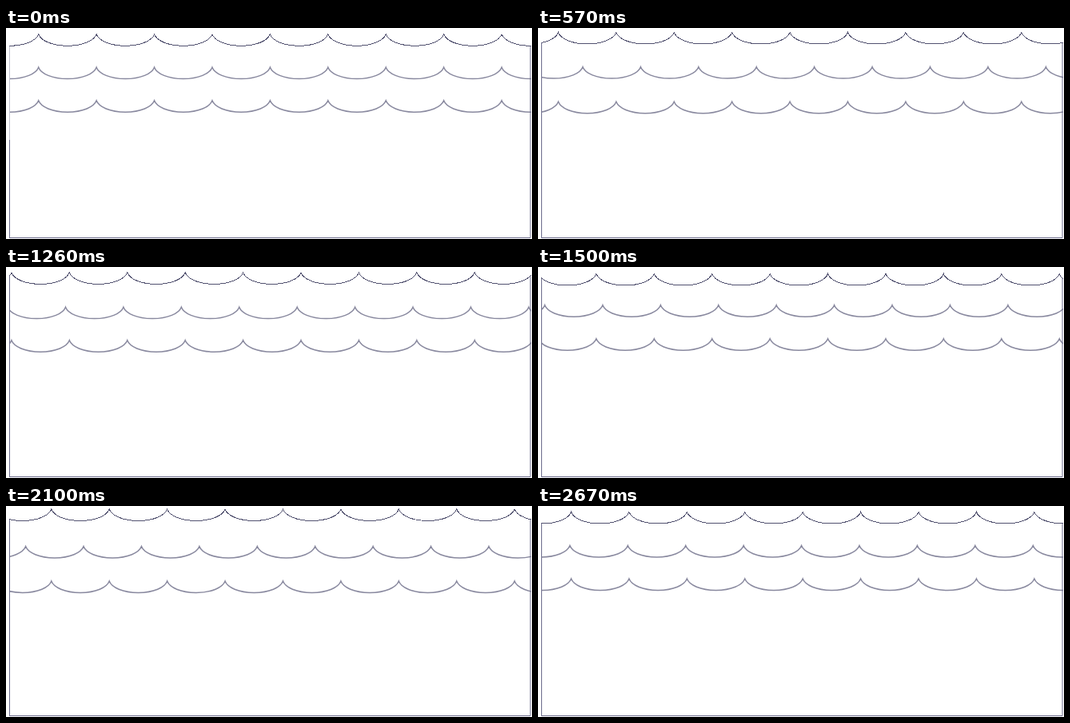
These frames come from a looping animation (658x264 px, 2.7 s). An HTML page:

```html
<!DOCTYPE html>
<html lang="en">
<head>
<meta charset="utf-8">
<title>Waves</title>
<style>
html, body { margin: 0; width: 100%; height: 100%; overflow: hidden; background: #fff; }
svg { display: block; }
path { fill: none; }
.soft { stroke: #89899f; stroke-width: 1.5; }
.crisp { stroke-width: 1; shape-rendering: crispEdges; }
</style>
</head>
<body>
<svg width="658" height="264" viewBox="0 0 658 264">
  <clipPath id="tank"><rect x="4" y="0" width="653" height="264"/></clipPath>
  <g clip-path="url(#tank)">
    <path id="low" class="soft"/>
    <path id="mid" class="soft"/>
    <path id="top" class="crisp" stroke="#525270"/>
  </g>
  <path id="box" class="crisp" stroke="#6d6d8c"/>
  <path id="wall" stroke="#6d6d8c"/>
  <path id="faint" class="crisp" d="M4.5 23V140" stroke="#c3c3d0"/>
</svg>
<script>
const LOOP = 2700, STEP = 30;
const LEFT = 4.5, RIGHT = 656, FLOOR = 262.5;
const SPAN = 72.42, HALF = SPAN / 2, RISE = 14.4;
// control points of half a trough, measured from its crest
const X1 = 3, Y1 = 8, X2 = 17;

const waves = [
  { id: 'top', y: 20.6, amp: 2.4, phase: 0.13, dir: -1 },
  { id: 'mid', y: 63.9, amp: 2.4, phase: 0.73, dir: 1 },
  { id: 'low', y: 106.5, amp: 2.4, phase: 0.66, dir: -1 }
];
const el = id => document.getElementById(id);
const mod = (a, n) => ((a % n) + n) % n;
const bezier = (t, a, b, c) =>
  3 * t * (1 - t) * (1 - t) * a + 3 * t * t * (1 - t) * b + t * t * t * c;

function wavePath(crest, trough) {
  const y = trough - RISE;
  let x = mod(crest, SPAN) - 2 * SPAN;
  let d = `M${x} ${y}`;
  for (; x < RIGHT + SPAN; x += SPAN) {
    d += `C${x + X1} ${y + Y1} ${x + X2} ${trough} ${x + HALF} ${trough}`
      + `S${x + SPAN - X1} ${y + Y1} ${x + SPAN} ${y}`;
  }
  return d;
}

// height of a wave where it meets the wall at x
function wallY(x, crest, trough) {
  const gap = mod(x - crest, SPAN);
  const dx = Math.min(gap, SPAN - gap);
  let lo = 0, hi = 1;
  for (let i = 0; i < 24; i++) {
    const t = (lo + hi) / 2;
    if (bezier(t, X1, X2, HALF) < dx) lo = t; else hi = t;
  }
  return trough - RISE + bezier(lo, Y1, RISE, RISE);
}

function draw(ms) {
  const p = Math.floor(mod(ms, LOOP) / STEP) * STEP / LOOP;
  for (const w of waves) {
    const crest = LEFT + HALF + w.dir * p * SPAN;
    const trough = w.y + w.amp * Math.cos(2 * Math.PI * (2 * p - w.phase));
    el(w.id).setAttribute('d', wavePath(crest, trough));
    if (w.id === 'top') {
      el('box').setAttribute('d', `M${LEFT} ${wallY(LEFT, crest, trough)}V${FLOOR}H${RIGHT}`);
      el('wall').setAttribute('d', `M${RIGHT} ${FLOOR}V${wallY(RIGHT, crest, trough)}`);
    }
  }
  el('faint').setAttribute('visibility', p === 0 ? 'visible' : 'hidden');
}

const start = performance.now();
function tick() {
  draw(performance.now() - start);
  requestAnimationFrame(tick);
}
draw(0);
requestAnimationFrame(tick);
</script>
</body>
</html>
```
